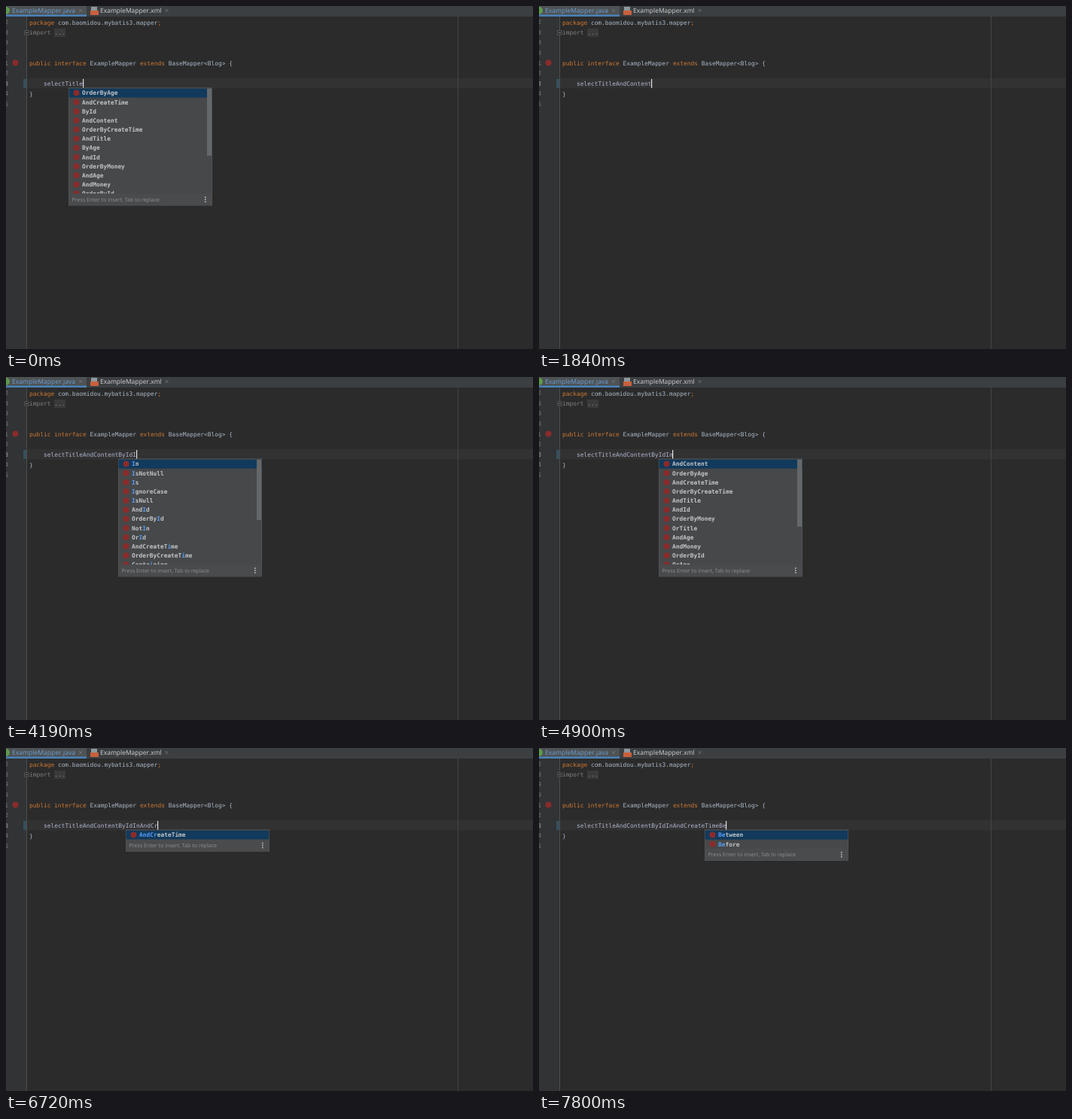
Write an HTML page with a canvas that moves like this. It is 700 px wide and 456 px high and loops after 8 s.

```html
<!DOCTYPE html>
<html lang="en">
<head>
<meta charset="utf-8">
<title>Code completion</title>
<style>
  html, body { margin: 0; width: 100%; height: 100%; overflow: hidden; background: #2b2b2b; }
  canvas { display: block; }
</style>
</head>
<body>
<canvas id="stage" width="700" height="456"></canvas>
<script>
const ctx = document.getElementById('stage').getContext('2d');
const LOOP = 8000;
const CELL = 4.738;       // advance of one code character
const ROW = 12.17;        // popup row height
const MAX_ROWS = 11.5;
const MONO = '7.87px "DejaVu Sans Mono", monospace';
const UI = '"Open Sans", "Noto Sans", sans-serif';

const ands = 'AndContent AndCreateTime AndTitle AndId AndAge AndMoney';
const clauses = 'AndContent OrderByAge AndCreateTime OrderByCreateTime AndTitle AndId ' +
  'OrderByMoney OrTitle AndAge AndMoney OrderById OrAge';
const lists = {
  title: 'OrderByAge AndCreateTime ById AndContent OrderByCreateTime AndTitle ByAge AndId ' +
    'OrderByMoney AndAge AndMoney OrderById',
  titleA: 'AndCreateTime AndContent AndTitle AndId AndAge AndMoney OrderByAge ' +
    'OrderByCreateTime ByAge ByCreateTime',
  ac: 'AndCreateTime AndContent',
  content: 'OrderByAge AndCreateTime ById OrderByCreateTime AndTitle ByAge AndId ' +
    'OrderByMoney AndAge AndMoney OrderById ByContent',
  by: 'ById ByAge ByContent ByCreateTime ByMoney ByTitle OrderByAge OrderByCreateTime ' +
    'OrderByMoney OrderById OrderByContent OrderByTitle',
  id: 'AndContent OrderByAge In IsNotNull AndCreateTime Is OrderByCreateTime AndTitle ' +
    'AndId OrderByMoney IsNull AndAge',
  idI: 'In IsNotNull Is IgnoreCase IsNull AndId OrderById NotIn OrId AndCreateTime ' +
    'OrderByCreateTime Containing',
  clauses,
  clausesA: ands + ' OrAge OrderByAge OrderByCreateTime OrCreateTime',
  ands,
  andC: 'AndContent AndCreateTime',
  andCr: 'AndCreateTime',
  time: 'AndContent OrderByAge Between Before AndTitle OrderByCreateTime AndId After ' +
    'OrderByMoney AndAge AndMoney OrderById',
  timeB: 'Between Before OrderByAge OrderByCreateTime OrderByMoney OrderById OrderByContent ' +
    'OrderByTitle NotBetween IsNotBlank IsBlank Number',
  be: 'Between Before'
};

const T1 = 'selectTitle', T2 = T1 + 'AndContent', T3 = T2 + 'ById';
const T4 = T3 + 'In', T5 = T4 + 'AndCreateTime';

// start time, accepted text, typed prefix, popup x, list, total items, flags
const steps = [
  [0, T1, '', 83, 'title', 18],
  [280, T1, '', 83, 'title', 18, 'nocaret'],
  [710, T1, 'A', 83, 'titleA'],
  [1080, T1, 'AC', 83, 'ac'],
  [1350, T1, 'ACo', 83, 'andC1'],
  [1470, T1, 'ACon', 83, 'andC1'],
  [1840, T2, ''],
  [1960, T2, '', 130, 'content', 18],
  [2680, T2, '', 130, 'content', 18, 'nocaret'],
  [2980, T2, 'B', 130, 'by', 12],
  [3790, T3, ''],
  [3920, T3, '', 149, 'id', 28],
  [4190, T3, 'I', 149, 'idI', 20],
  [4750, T4, ''],
  [4900, T4, '', 159, 'clauses', 18],
  [5170, T4, 'A', 159, 'clausesA'],
  [5290, T4, 'An', 159, 'ands'],
  [5450, T4, 'And', 159, 'ands'],
  [6130, T4, 'AndC', 159, 'andC'],
  [6720, T4, 'AndCr', 159, 'andCr'],
  [7130, T5, '', 220, 'time', 22],
  [7520, T5, 'B', 220, 'timeB', 14],
  [7640, T5, 'Be', 220, 'be', 2, 'nohint'],
  [7800, T5, 'Be', 220, 'be']
];
lists.andC1 = 'AndContent';

function rect(x, y, w, h, color) {
  ctx.fillStyle = color;
  ctx.fillRect(x, y, w, h);
}

function dot(x, y, r, color) {
  ctx.fillStyle = color;
  ctx.beginPath();
  ctx.arc(x, y, r, 0, 2 * Math.PI);
  ctx.fill();
}

// y is the middle of the capitals
function label(str, x, y, color, font = MONO) {
  ctx.font = font;
  ctx.fillStyle = color;
  ctx.fillText(str, x, y + 2.8);
}

function cross(x, y) {
  ctx.strokeStyle = '#777a7c';
  ctx.lineWidth = 0.8;
  ctx.beginPath();
  ctx.moveTo(x - 2, y - 2); ctx.lineTo(x + 2, y + 2);
  ctx.moveTo(x + 2, y - 2); ctx.lineTo(x - 2, y + 2);
  ctx.stroke();
}

// draws [text, colour] pairs on the character grid
function code(y, ...parts) {
  let col = 0;
  for (const [str, color] of parts) {
    label(str, 31 + col * CELL, y, color);
    col += str.length;
  }
}

function drawTabs() {
  rect(0, 0, 700, 14, '#3c3f41');
  rect(0, 0, 107, 14, '#4e5254');
  rect(0, 11.5, 107, 2.5, '#4a82b8');
  dot(0, 6, 5, '#5c9a4c');
  label('ExampleMapper.java', 8, 6, '#6a9fd4', '8.6px ' + UI);
  cross(99, 6);
  rect(113, 1, 8, 5, '#8f989d');
  rect(112, 6, 11, 6, '#c8603c');
  label('ExampleMapper.xml', 125, 6, '#d0d2d4', '8.5px ' + UI);
  cross(213.5, 6);
}

function drawEditor() {
  const key = '#cc7832', plain = '#a9b7c6';
  rect(0, 14, 700, 442, '#2b2b2b');
  rect(0, 14, 27, 442, '#313335');
  rect(28, 96, 672, 13.5, '#323232');
  rect(27, 14, 1, 442, '#4b4d4e');
  rect(600, 14, 1, 442, '#454545');
  rect(23, 97, 4, 12, '#374f5c');
  [...'239012345'].forEach((d, i) => label(d, -1.8, 21.5 + i * 13.56, i == 6 ? '#a4a3a3' : '#777a7d'));
  dot(12.5, 75.5, 4, '#8a2b2b');

  rect(24.5, 32.5, 6, 6, '#606366');
  rect(25.3, 33.3, 4.4, 4.4, '#2b2b2b');
  rect(26, 35.1, 3, 0.8, '#8a8c8e');
  rect(64, 30, 15, 11, '#3a3a3a');

  code(21.7, ['package ', key], ['com.baomidou.mybatis3.mapper', plain], [';', key]);
  code(35.2, ['import ', '#808080'], ['...', '#8c8c8c']);
  code(75.8, ['public interface ', key], ['ExampleMapper ', plain], ['extends ', key],
    ['BaseMapper<Blog> {', plain]);
  code(116.8, ['}', plain]);
}

// positions of the prefix letters inside an item
function matches(item, prefix) {
  const found = [];
  let from = 0;
  for (const c of prefix) {
    let at = item.indexOf(c, from);
    if (at < 0) at = item.indexOf(c.toLowerCase(), from);
    if (at < 0) break;
    found.push(at);
    from = at + 1;
  }
  return found;
}

function drawItem(item, prefix, x, y) {
  dot(x + 10.5, y, 4, '#8a2b2b');
  const hits = matches(item, prefix);
  [...item].forEach((c, i) =>
    label(c, x + 18 + i * CELL, y, hits.includes(i) ? '#589df6' : '#c3c5c7', 'bold ' + MONO));
}

function drawPopup(x, items, prefix, total, hint) {
  const top = 109.5, w = 191;
  const listH = Math.min(items.length, MAX_ROWS) * ROW;
  const foot = top + listH;
  rect(x, top - 1, w, listH + 17, '#57595b');
  rect(x + 0.7, top - 0.3, w - 1.4, listH + 15.6, '#46484a');

  ctx.save();
  ctx.beginPath();
  ctx.rect(x, top, w, listH);
  ctx.clip();
  rect(x + 0.7, top, w - 1.4, ROW, '#113a5c');
  items.forEach((item, i) => drawItem(item, prefix, x, top + (i + 0.5) * ROW));
  if (total > MAX_ROWS) rect(x + 184, top, 6, listH * MAX_ROWS / total, '#65686a');
  ctx.restore();

  rect(x + 0.7, foot, w - 1.4, 15.3, '#494b4d');
  if (!hint) return;
  label('Press Enter to insert, Tab to replace', x + 4.5, foot + 7.8, '#8e9092', '7.1px ' + UI);
  for (let i = -1; i < 2; i++) rect(x + 181, foot + 7 + i * 3, 1.6, 1.6, '#c0c2c4');
}

function draw(now) {
  const t = now % LOOP;
  const [, done, prefix, x, list, total = 0, flag] = steps.findLast(s => s[0] <= t);
  const text = done + prefix;
  ctx.textRendering = 'geometricPrecision';
  drawEditor();
  drawTabs();
  label(text, 50, 103, '#b0b4d0');
  if (flag != 'nocaret') rect(Math.round(50 + text.length * CELL - 0.5), 97, 1.2, 12, '#e0e0e0');
  if (list) drawPopup(x, lists[list].split(' '), prefix, total, flag != 'nohint');
}

const start = performance.now();
function tick() {
  draw(performance.now() - start);
  requestAnimationFrame(tick);
}
tick();
</script>
</body>
</html>
```
